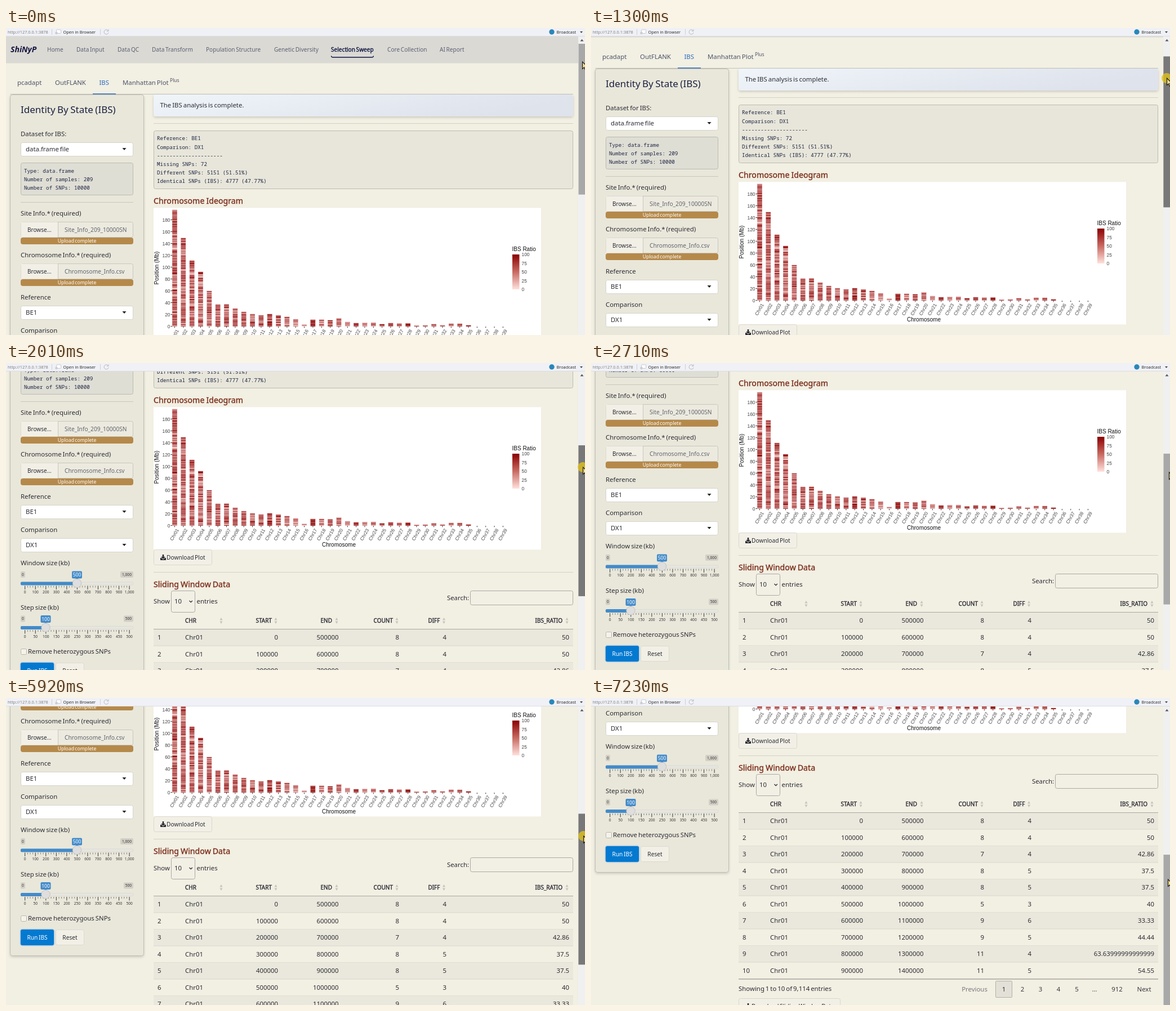
Animation of 1028 by 545 pixels, one loop 8 s. Source, as an HTML page:

```html
<!DOCTYPE html>
<html lang="en">
<head>
<meta charset="utf-8">
<title>IBS analysis</title>
<style>
html, body { margin: 0; width: 100%; height: 100%; overflow: hidden; background: #f2efe3; }
svg { display: block; width: 1028px; height: 545px; animation: drag 8s step-end infinite, press 8s step-end infinite; }
text { font-family: "Noto Sans", sans-serif; font-size: 11.4px; word-spacing: -1px; fill: #2b2b33; white-space: pre; }
.nav { font-size: 10.1px; fill: #5d6172; }
.small { font-size: 10.2px; }
.strong { stroke: currentColor; stroke-width: .35px; }
.head { font-size: 14.2px; fill: #7a2c18; color: #7a2c18; word-spacing: -.7px; }
.th { font-size: 10px; fill: #2b2b33; color: #2b2b33; }
.code { font: 9.28px "Noto Sans Mono", monospace; word-spacing: 0; fill: #1c2340; }
.plot { font-family: "Liberation Sans", sans-serif; font-size: 10px; word-spacing: 0; fill: #111; }
.tick { font-size: 8.4px; fill: #444; }
.tiny { font-size: 6.6px; fill: #333; }
.bar { font-family: "Open Sans", sans-serif; font-size: 7.4px; word-spacing: 0; fill: #222; }
.page { transform: translateY(calc(var(--s) * -1px)); }
.thumb { transform: translateY(calc(var(--s) * .4905px)); }
.cursor { transform: translate(calc(var(--x) * 1px), calc(var(--y) * 1px)); }
.held { opacity: var(--p); }

/* s: scroll offset, x and y: pointer tip */
@keyframes drag {
  0% { --s: 0; --x: 1023; --y: 60; }
  12.375% { --s: 4; --x: 1023; --y: 63; }
  13.625% { --s: 12; --x: 1023; --y: 69; }
  15% { --s: 27; --x: 1022; --y: 78; }
  16.25% { --s: 46; --x: 1022; --y: 89; }
  17.625% { --s: 73; --x: 1022; --y: 105; }
  18.875% { --s: 104; --x: 1022; --y: 122; }
  20.125% { --s: 137; --x: 1022; --y: 140; }
  21.25% { --s: 167; --x: 1021; --y: 156; }
  22.625% { --s: 195; --x: 1022; --y: 168; }
  23.875% { --s: 220; --x: 1023; --y: 177; }
  25.125% { --s: 241; --x: 1024; --y: 185; }
  26.375% { --s: 257; --x: 1025; --y: 190; }
  27.625% { --s: 267; --x: 1026; --y: 193; }
  28.875% { --s: 271; --x: 1026; --y: 194; }
  68.875% { --s: 275; --x: 1026; --y: 197; }
  70.125% { --s: 290; --x: 1026; --y: 206; }
  71.5% { --s: 311; --x: 1025; --y: 218; }
  72.75% { --s: 336; --x: 1025; --y: 231; }
  74% { --s: 362; --x: 1025; --y: 245; }
  75.25% { --s: 390; --x: 1025; --y: 260; }
  76.5% { --s: 418; --x: 1025; --y: 275; }
  77.75% { --s: 446; --x: 1024; --y: 290; }
  79.125% { --s: 470; --x: 1024; --y: 303; }
  80.375% { --s: 493; --x: 1024; --y: 314; }
  81.625%, 100% { --s: 510; --x: 1024; --y: 322; }
}
@keyframes press {
  0%, 33.875%, 90.375%, 100% { --p: 0; }
  6.25%, 64% { --p: 1; }
}
</style>
</head>
<body>
<svg id="stage" viewBox="0 0 1028 545">
  <defs>
    <linearGradient id="ratio" x2="0" y2="1">
      <stop stop-color="#8b0000"/><stop offset=".5" stop-color="#c86a62"/><stop offset="1" stop-color="#ffe1dd"/>
    </linearGradient>
    <linearGradient id="notice" x2="1" y2=".3">
      <stop stop-color="#eff5f9"/><stop offset="1" stop-color="#dee3ec"/>
    </linearGradient>
    <filter id="soft" x="-5%" y="-20%" width="110%" height="150%">
      <feDropShadow dx="0" dy="2" stdDeviation="2" flood-opacity=".16"/>
    </filter>
  </defs>
</svg>
<script>
const INK = '#2b2b33', LINE = '#c9c7bd', BLUE = '#428bca';

// Text is placed by the middle of its capitals.
const sizes = { nav: 10.1, small: 10.2, head: 14.2, th: 10, code: 9.28, tick: 8.4, plot: 10, tiny: 6.6, bar: 7.4 };
const text = (x, y, str, cls = '', anchor = 'start', extra = '') => {
  const size = +(extra.match(/font-size:([\d.]+)/) || [])[1] ||
    sizes[['tick', 'head', 'th', 'small', 'nav', 'code', 'plot', 'tiny', 'bar'].find(c => cls.split(' ').includes(c))] || 11.4;
  return `<text x="${x}" y="${(y + size * .36).toFixed(2)}" class="${cls}" text-anchor="${anchor}" style="${extra}">${str}</text>`;
};
const rect = (x, y, w, h, fill, more = '') => `<rect x="${x}" y="${y}" width="${w}" height="${h}" fill="${fill}" ${more}/>`;
const box = (x, y, w, h, fill, stroke = LINE, r = 3) => rect(x + .5, y + .5, w - 1, h - 1, fill, `stroke="${stroke}" rx="${r}"`);
const line = (x1, y1, x2, y2, color = LINE, w = 1) =>
  `<path d="M${x1} ${y1}L${x2} ${y2}" stroke="${color}" stroke-width="${w}"/>`;
const shape = (d, fill) => `<path d="${d}" fill="${fill}"/>`;
const range = (n, f) => Array.from({ length: n }, (_, i) => f(i)).join('');

let seed = 7;
const rand = () => (seed = (seed * 16807) % 2147483647) / 2147483647;

function header() {
  const items = [[73, 'Home'], [125, 'Data Input'], [198, 'Data QC'], [259, 'Data Transform'],
    [355, 'Population Structure'], [476, 'Genetic Diversity'], [577, 'Selection Sweep'],
    [677, 'Core Collection'], [770, 'AI Report']];
  const nav = items.map(([x, s]) => x === 577
    ? text(x, 38, s, 'nav strong', 'start', 'fill:#0d1540;color:#0d1540')
    : text(x, 38, s, 'nav')).join('');
  const tab = 'fill:#4c5366';
  return rect(0, 15, 1016, 47.5, '#dad9d4') +
    text(8, 38, 'ShiNyP', '', 'start', 'font-size:14px;font-weight:700;font-style:italic;fill:#15163f') + nav +
    `<path d="M577.5 49.5q0 2.5 3 2.5h69q3 0 3-2.5" fill="none" stroke="#0d1540" stroke-width="1.3"/>` +
    text(20, 96.5, 'pcadapt', '', 'start', tab) + text(87, 96.5, 'OutFLANK', '', 'start', tab) +
    text(165.5, 96.5, 'IBS', '', 'start', 'fill:#2a6cbf') +
    text(207, 96.5, 'Manhattan Plot', '', 'start', tab) +
    text(291, 93, 'Plus', '', 'start', 'font-size:8.5px;' + tab) +
    line(7.5, 117.5, 1007, 117.5, '#c4c3bb');
}

const select = (y, s) => box(26, y, 200, 25, '#fff', '#d6d4ca') + text(35, y + 12, s) +
  shape(`M206.5 ${y + 10}h7l-3.5 4z`, '#222');

const upload = (y, label, file) => text(26, y - 15, label) +
  box(26, y, 200, 28, '#eceadf') + rect(26.5, y + .5, 66, 27, '#f2f0e6') + line(92.5, y, 92.5, y + 28) +
  text(38, y + 14, 'Browse...', '', 'start', 'font-size:10px') +
  text(104, y + 14, file, 'small', 'start', 'fill:#62646c') +
  rect(26, y + 28, 200, 12, '#b5894a', 'rx="4"') +
  text(126, y + 33.5, 'Upload complete', '', 'middle', 'font-size:8.7px;fill:#fff');

function slider(y, label, at, value, max, step) {
  const fmt = n => n.toLocaleString('en-US');
  const w = max > 999 ? 23 : 17;
  return text(26, y, label) +
    rect(26, y + 15, 8, 11, '#d2cfc6', 'rx="2"') + text(30, y + 20.5, '0', 'tiny', 'middle') +
    rect(226 - w, y + 15, w, 11, '#d2cfc6', 'rx="2"') + text(226 - w / 2, y + 20.5, fmt(max), 'tiny', 'middle') +
    rect(at - 9, y + 14.5, 18, 13, BLUE, 'rx="2"') + shape(`M${at - 2.5} ${y + 27}h5l-2.5 3z`, BLUE) +
    text(at, y + 21, value, '', 'middle', 'font-size:8.6px;fill:#fff') +
    rect(26, y + 34, 200, 5, '#e6e5df', 'rx="2" stroke="#d6d5cd" stroke-width=".6"') +
    rect(26, y + 33.5, at - 26, 6, BLUE, 'rx="2"') +
    range(41, i => {
      const x = 33.7 + i * 4.635;
      return line(x, y + 40.5, x, y + (i % 4 ? 43.5 : 47), i % 4 ? '#777' : '#222', .9);
    }) +
    range(11, i => text(33.7 + i * 18.54, y + 52, fmt(i * step), 'tiny', 'middle')) +
    `<circle cx="${at}" cy="${y + 36}" r="7.7" fill="#dedede" stroke="#bbb" stroke-width=".8"/>`;
}

function sidebar() {
  return `<g filter="url(#soft)">${box(7, 118, 238, 702, '#e9e7da', '#bfbeb4', 4)}</g>` +
    text(26, 145, 'Identity By State (IBS)', '', 'start', 'font-size:17px;fill:#1a2040') +
    text(26, 187.5, 'Dataset for IBS:') + select(203, 'data.frame file') +
    box(26, 239, 200, 58, '#dfded5', '#bcbbb3') +
    ['Type: data.frame', 'Number of samples: 209', 'Number of SNPs: 10000']
      .map((s, i) => text(32, 253.3 + i * 15.3, s, 'code')).join('') +
    line(26, 309.5, 226, 309.5) +
    upload(344, 'Site Info.* (required)', 'Site_Info_209_10000SN') +
    upload(418, 'Chromosome Info.* (required)', 'Chromosome_Info.csv') +
    text(26, 478, 'Reference') + select(493, 'BE1') +
    text(26, 537, 'Comparison') + select(552, 'DX1') +
    slider(596, 'Window size (kb)', 126, 500, 1000, 100) +
    slider(674.5, 'Step size (kb)', 70.5, 100, 500, 50) +
    rect(26.5, 748.5, 10, 10, '#f4f2e9', 'rx="2" stroke="#b9b8b0"') +
    text(39, 753, 'Remove heterozygous SNPs') +
    rect(24.5, 771.5, 62, 31, '#b5cfe0', 'rx="5"') + rect(26, 773, 59, 28, '#0479d0', 'rx="3"') +
    text(55.5, 787, 'Run IBS', 'small', 'middle', 'fill:#fff') +
    box(88, 773, 51, 28, '#f2f0e6', '#dcdacf') + text(113.5, 787, 'Reset', 'small', 'middle');
}

const heights = [207, 157, 117, 97, 63, 39, 39, 32, 26, 22, 20, 22, 20, 17, 13, 3, 12, 12, 11, 15, 8, 6, 7, 7,
  4, 6, 5, 6, 2, 2, 4, 2, 5, 5, 2, 1, 1, 1, 1];
const dark = [12, 17, 19, 22, 25, 28], pale = [15, 16, 21, 23];

function shade(chr) {
  const r = rand();
  let v = r < .2 ? .12 + rand() * .25 : r < .88 ? .5 + rand() * .28 : .85 + rand() * .15;
  if (dark.includes(chr)) v = Math.min(1, v + .22);
  if (pale.includes(chr)) v *= .65;
  const mix = (a, b) => Math.round(a + (b - a) * v);
  return `rgb(${mix(255, 139)},${mix(225, 0)},${mix(221, 0)})`;
}

function chart() {
  const base = 529.8;
  const bars = heights.map((h, i) => {
    const x = 299.5 + i * 15.34, name = 'Chr' + String(i + 1).padStart(2, '0');
    const stripes = i < 35
      ? range(Math.ceil(h / 1.3), k => {
          const y = base - Math.min(h, (k + 1) * 1.3);
          return rect((x - 4.3).toFixed(1), y.toFixed(1), 8.6, 1.35, shade(i + 1));
        })
      : '';
    return stripes + line(x, 530, x, 532.3, '#333') +
      `<text class="plot tick" text-anchor="middle" transform="translate(${x + 2} 547) rotate(-60)">${name}</text>`;
  }).join('');
  return rect(262, 319.3, 688, 253, '#fff') + bars +
    range(10, i => {
      const y = 529.5 - i * 21;
      return line(292.5, y, 295, y, '#333') + text(291.5, y, i * 20, 'plot tick', 'end');
    }) +
    '<text class="plot" text-anchor="middle" transform="translate(271.3 426) rotate(-90)">Position (Mb)</text>' +
    text(591, 563, 'Chromosome', 'plot', 'middle') +
    text(898.5, 392, 'IBS Ratio', 'plot') + rect(899, 402, 12.5, 62, 'url(#ratio)') +
    range(5, i => text(915.5, 402.3 + i * 15.5, 100 - i * 25, 'plot tick'));
}

const download = (y, w, s) => box(262, y, w, 28, '#f2f0e6', '#dad8cd') +
  shape(`M277.7 ${y + 9}h2.6v4h2.6l-3.9 4-3.9-4h2.6zM274 ${y + 15}h2l3 3 3-3h2v4h-10z`, INK) +
  text(285, y + 14, s, 'small');

function results() {
  const log = ['Reference: BE1', 'Comparison: DX1', '-'.repeat(21), 'Missing SNPs: 72',
    'Different SNPs: 5151 (51.51%)', 'Identical SNPs (IBS): 4777 (47.77%)'];
  return `<g filter="url(#soft)">${rect(262, 118, 745, 39, 'url(#notice)', 'rx="4"')}</g>` +
    text(273.5, 137, 'The IBS analysis is complete.') +
    line(262, 169.5, 1007, 169.5, '#d3d1c6') +
    box(262, 182, 745, 104, '#e8e6da', '#bcbbb2') +
    log.map((s, i) => text(268, 196 + i * 15.2, s, 'code')).join('') +
    text(262, 307, 'Chromosome Ideogram', 'head strong') + chart() +
    download(572, 104, 'Download Plot') + line(262, 612.5, 1007, 612.5, '#d3d1c6') +
    text(262, 634, 'Sliding Window Data', 'head strong');
}

function table() {
  const counts = [8, 8, 7, 8, 8, 5, 9, 9, 11, 11], diffs = [4, 4, 4, 5, 5, 3, 6, 5, 4, 5];
  const ends = [483, 590.5, 698, 782, 1000];
  const sort = x => shape(`M${x - 2.5} 697.5h5l-2.5-4.5zM${x - 2.5} 699.5h5l-2.5 4.5z`, '#c5c4bd');
  const rows = range(10, i => {
    const y = 713.5 + i * 29.5, c = counts[i], d = diffs[i];
    const ratio = i === 8 ? '63.63999999999999' : Math.round((c - d) / c * 1e4) / 100;
    const cells = [i * 1e5, i * 1e5 + 5e5, c, d, ratio];
    return (i % 2 ? '' : rect(262, y, 745, 29.5, '#eae8dc')) + line(262, y + 29.5, 1007, y + 29.5, '#d9d7cc') +
      text(269, y + 14.5, i + 1) + text(318, y + 14.5, 'Chr01') +
      cells.map((v, k) => text(ends[k], y + 14.5, v, '', 'end')).join('');
  });
  const heads = [[472, 'START'], [579, 'END'], [687, 'COUNT'], [770.5, 'DIFF'], [988, 'IBS_RATIO']];
  const pages = [[766, '2'], [798, '3'], [830, '4'], [862.5, '5'], [894, '…'], [934, '912'], [982, 'Next']];
  const grey = 'fill:#3a3a40';
  return text(262, 664, 'Show') + box(293, 645, 43, 39, '#f2f0e5', '#aaa9a2') + text(299, 664, '10') +
    '<path d="M325.5 663l2.7 2.7 2.7-2.7" fill="none" stroke="#222" stroke-width="1.2"/>' +
    text(338.5, 664, 'entries') + text(822, 657.5, 'Search:', '', 'end') +
    box(824, 645, 183, 26, '#f2f0e5', '#aaa9a2') +
    text(318, 698.5, 'CHR', 'th strong') +
    heads.map(([x, s]) => text(x, 698.5, s, 'th strong', 'end')).join('') +
    [382, 479, 587, 694, 777.5, 996].map(sort).join('') + rows +
    line(262, 713.5, 1007, 713.5, '#a9a8a0') + line(262, 1009, 1007, 1009, '#8d8c86') +
    text(262, 1026, 'Showing 1 to 10 of 9,114 entries') +
    text(681, 1026.5, 'Previous', '', 'middle', 'fill:#77777a') +
    box(718, 1012, 30, 30, '#e3e1d7', '#b0afa8', 1) + text(733, 1026.5, '1', '', 'middle') +
    pages.map(([x, s]) => text(x, 1026.5, s, '', 'middle', grey)).join('') +
    download(1043, 181, 'Download Sliding Window Data');
}

function chrome() {
  return rect(0, 0, 1028, 15, '#f0f1f6') + line(0, 14.5, 1028, 14.5, '#dcdde0') +
    text(3, 7, 'http://127.0.0.1:3878', 'bar', 'start', 'fill:#777') +
    line(81.5, 2, 81.5, 12, '#cfd0d4') + line(167.5, 2, 167.5, 12, '#cfd0d4') +
    rect(89.5, 3, 8, 6.5, '#fff', 'stroke="#b9bdc6" stroke-width=".8" rx="1"') +
    '<circle cx="89.5" cy="9" r="2.3" fill="#c8ccd4"/>' + text(101.5, 7.5, 'Open in Browser', 'bar') +
    '<path d="M181 4.3a4 4 0 1 0 1 3.7M182 2.5v3h-3" fill="none" stroke="#b5b7bd"/>' +
    '<circle cx="969" cy="7" r="4.7" fill="#2a87b8"/>' + text(977.5, 7.5, 'Broadcast', 'bar') +
    shape('M1019 6h5l-2.5 3z', '#444');
}

function scrollbar() {
  return rect(1016, 15, 12, 530, '#f0f0f1') + shape('M1019.5 23.5h6l-3-3.8z', '#555') +
    `<g class="thumb">${rect(1016.5, 28, 11.5, 267.7, '#a8a8a8')}${rect(1016.5, 28, 11.5, 267.7, '#787878', 'class="held"')}</g>` +
    '<g class="cursor"><circle class="held" r="9" fill="#dfc01c" fill-opacity=".8"/>' +
    '<path d="M.5 0v12.5l3-2.6 2 4.6 2-.9-2-4.4h4z" fill="#f3d888" stroke="#151515" stroke-width="1.1"/></g>';
}

document.getElementById('stage').insertAdjacentHTML('beforeend',
  rect(0, 0, 1028, 545, '#f2efe3') +
  `<g class="page">${header()}${sidebar()}${results()}${table()}${line(154, 117, 195, 117, '#2a6cbf', 1.6)}</g>` +
  scrollbar() + chrome());
</script>
</body>
</html>
```
